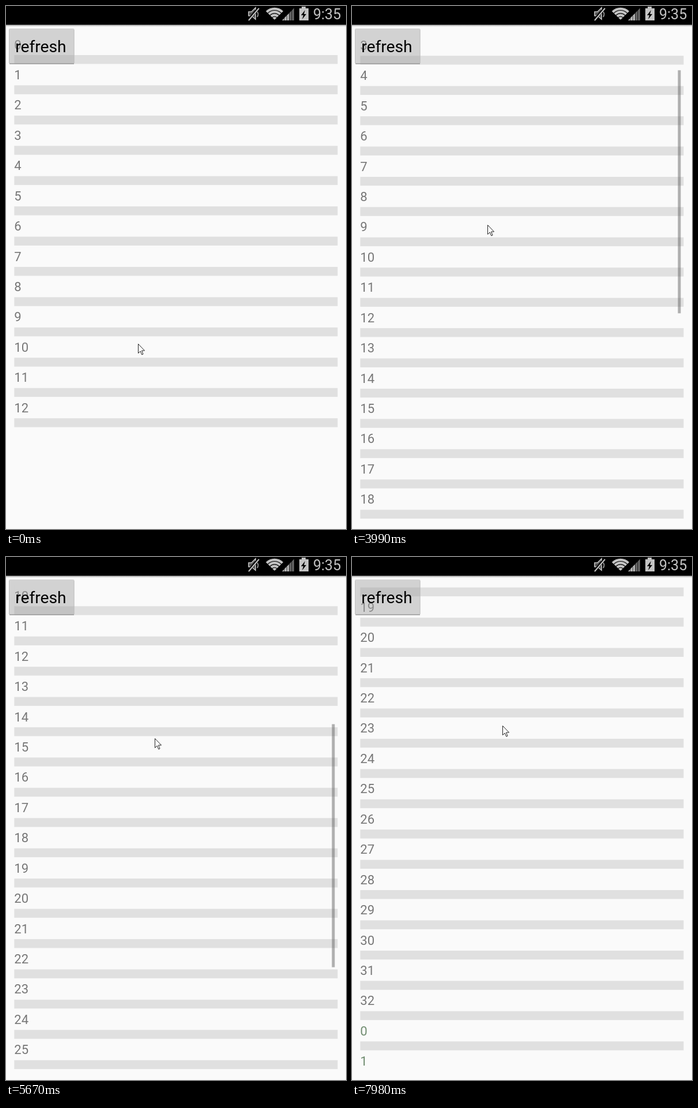
Recreate the animation shown at these times as an HTML page. Size 590 by 906 pixels, loop 8000 ms.

```html
<!DOCTYPE html>
<html lang="en">
<head>
<meta charset="utf-8">
<title>Refreshing list</title>
<style>
  html, body { margin: 0; width: 100%; height: 100%; overflow: hidden; background: #fafafa; }
  svg { display: block; width: 590px; height: 906px; font-family: Roboto, sans-serif; }
  #labels { font-size: 22px; fill: #777; }
  #bars { fill: #e0e0e0; }
  #button rect { fill: rgba(160, 160, 160, .45); }
  #button.pressed rect { fill: rgba(120, 120, 120, .6); }
</style>
</head>
<body>
<svg viewBox="0 0 590 906">
  <defs>
    <clipPath id="labelClip"><rect y="48" width="590" height="844"/></clipPath>
    <linearGradient id="shade" x2="0" y2="1">
      <stop stop-color="#999"/><stop offset="1" stop-color="#fafafa"/>
    </linearGradient>
  </defs>
  <rect width="590" height="906" fill="#fafafa"/>

  <g id="bars"></g>
  <g id="labels" clip-path="url(#labelClip)"></g>
  <rect id="thumb" x="565.5" width="5" fill="rgba(102,102,102,.5)"/>

  <g id="button">
    <rect x="5" y="39" width="113.5" height="61" rx="2"/>
    <path d="M6 100H118" stroke="#999" stroke-width="1.4"/>
    <path d="M5.5 41V99M118 41V99" stroke="#bbb" stroke-width=".8"/>
    <text x="16.2" y="80" font-size="28.2">refresh</text>
  </g>

  <rect y="32" width="590" height="4" fill="url(#shade)"/>
  <rect width="590" height="32.5"/>
  <g id="status" fill="#c4c4c4">
    <path d="M421 10h5l7-7v20l-7-6h-5z" fill="#555" stroke="#c4c4c4" stroke-width="1.6"/>
    <path d="M420 25L439 3" stroke="#000" stroke-width="4.5"/>
    <path d="M421 25L439 4" stroke="#c4c4c4" stroke-width="2"/>
    <path d="M436 10q3 4 0 9" fill="none" stroke="#aaa" stroke-width="1.6"/>
    <g id="wifi" fill="none" stroke="#c4c4c4" stroke-width="4.3"></g>
    <g id="signal"></g>
    <path d="M513 1h7v3h5v21h-16v-21h4z"/>
    <path d="M519 7l-7 9h4l-2 7 7-9h-4z" fill="#000"/>
    <text x="533" y="23" font-size="25">9:35</text>
  </g>

  <path id="cursor" d="M.5 .5V16.5L4.2 13L6.8 19L9 18L6.5 12H11.5Z"
        fill="#fff" stroke="#222" stroke-width="1"/>
</svg>
<script>
const LOOP = 8000, STEP = 70;
const PITCH = 52.43, FIRST_BAR = 85, FIRST_BASELINE = 74.6;
const $ = id => document.getElementById(id);

function add(parent, tag, attrs, text = '') {
  const el = document.createElementNS('http://www.w3.org/2000/svg', tag);
  for (const key in attrs) el.setAttribute(key, attrs[key]);
  el.textContent = text;
  return parent.appendChild(el);
}

// Each move: start, end, then the values reached; values hold between moves.
const cursorMoves = [
  [70, 770, 274, 180],
  [910, 1540, 77, 76],
  [2940, 3500, 230, 556],
  [3570, 3990, 235, 379],
  [3990, 4690, 240, 221],
  [4690, 5320, 261, 537],
  [5320, 5880, 256, 180],
  [5950, 6230, 250, 590],
  [6230, 6825, 261, 278],
  [7910, 7980, 261, 292]
];
const scrollMoves = [
  [3570, 3990, 156.1],
  [3990, 4690, 299.2],
  [5320, 5880, 659],
  [6230, 7070, 976]
];

const clamp = v => Math.min(1, Math.max(0, v));

const follow = (moves, initial, t) => moves.reduce((from, [start, end, ...to]) => {
  const k = clamp((t - start) / (end - start));
  return from.map((v, i) => v + (to[i] - v) * k);
}, initial);

const rows = Array.from({ length: 35 }, (_, i) => ({
  bar: add($('bars'), 'rect', { x: 14.3, width: 561.2, height: 15.4 }),
  label: add($('labels'), 'text', { x: 14.3, ...(i > 32 && { fill: '#708c70' }) }, i % 33)
}));

for (let i = 0; i < 4; i++) {
  const r = 3 + 5.4 * i, d = r * Math.SQRT1_2;
  add($('wifi'), 'path', { d: `M${466 - d} ${24 - d}A${r} ${r} 0 0 1 ${466 + d} ${24 - d}` });
}
for (let i = 0; i < 5; i++) {
  const x = 479 + i * 4.3, top = 25 - 4.4 * i;
  add($('signal'), 'path',
    { d: `M${x} 25V${top}l3.6 -3.8V25z`, fill: i < 3 ? '#bbb' : '#666' });
}

const rowCount = t => t < 1750 ? 13 : t < 2520 ? 14 : t < 7630 ? 33 : 35;
const isPressed = t => (t >= 1610 && t < 1750) || (t >= 2380 && t < 2520);
const show = (el, visible) => { el.style.display = visible ? '' : 'none'; };

function drawRows(t, scroll) {
  const count = rowCount(t);
  rows.forEach(({ bar, label }, i) => {
    const offset = i * PITCH - scroll;
    const barTop = FIRST_BAR + offset;
    bar.setAttribute('y', barTop);
    label.setAttribute('y', Math.round(FIRST_BASELINE + offset));
    show(bar, i < count && barTop > 49 && barTop < 891);
    show(label, i < count);
  });
}

// The thumb shrinks as the last rows extend the list, then fades.
function drawThumb(t, scroll) {
  const pos = scroll / PITCH;
  const end = clamp((pos - 14.62) / 4);
  const length = (pos % 1 > 0.68 && !end ? 421 : 411) - 33 * end;
  const center = 246.2 + 25.4 * pos - 22 * end;
  $('thumb').setAttribute('y', center - length / 2);
  $('thumb').setAttribute('height', length);
  $('thumb').setAttribute('opacity', t < 3640 ? 0 : clamp((7490 - t) / 210));
}

function render(now) {
  const t = Math.floor(now % LOOP / STEP) * STEP;
  const [x, y] = follow(cursorMoves, [229, 585], t).map(Math.round);
  const [scroll] = follow(scrollMoves, [0], t);
  $('cursor').setAttribute('transform', `translate(${x} ${y})`);
  $('button').classList.toggle('pressed', isPressed(t));
  drawRows(t, scroll);
  drawThumb(t, scroll);
}

const start = performance.now();
function tick() {
  render(performance.now() - start);
  requestAnimationFrame(tick);
}
tick();
</script>
</body>
</html>
```
